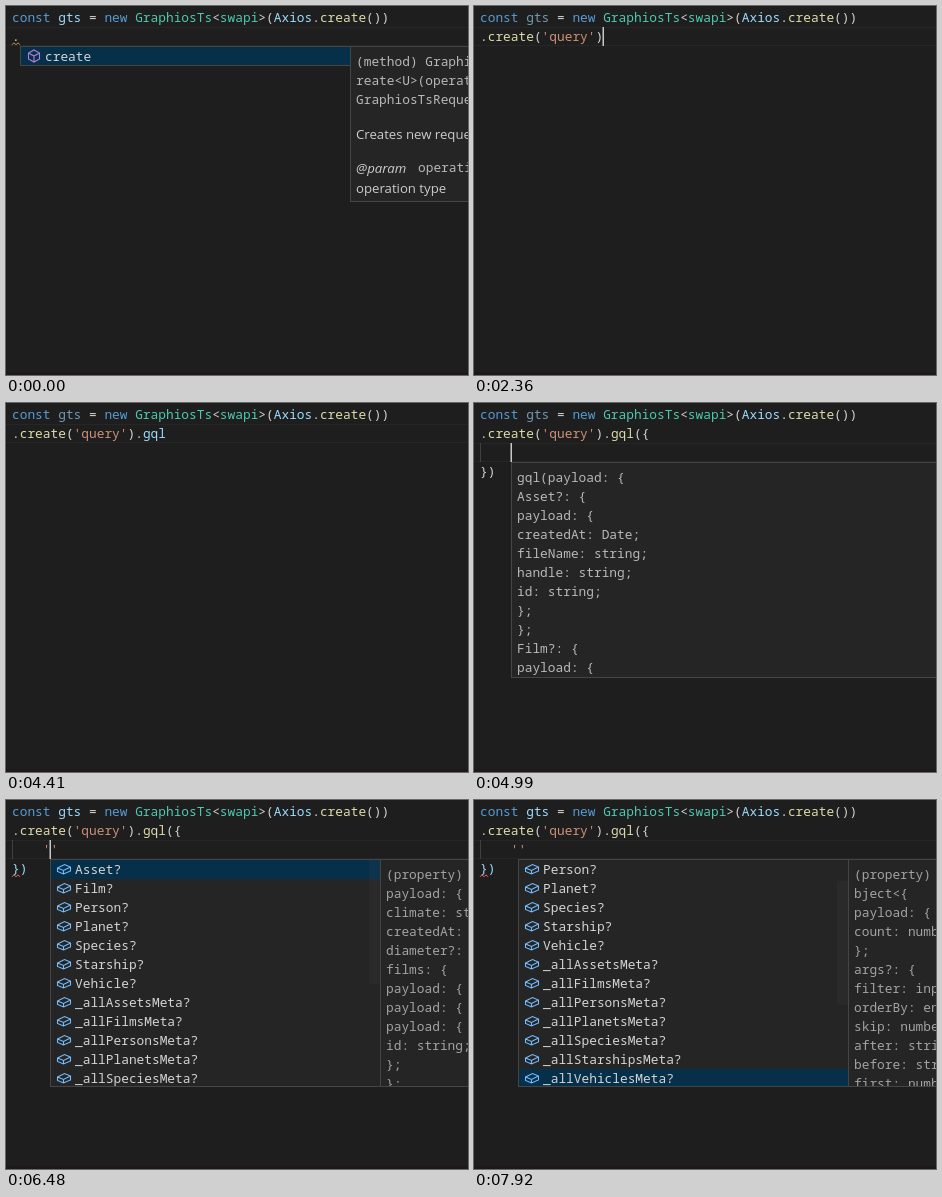
Recreate the animation shown at these times as an HTML page. Size 462 by 369 pixels, loop 8 s.

```html
<!DOCTYPE html>
<html lang="en">
<head>
<meta charset="utf-8">
<title>Typed query autocompletion</title>
<style>
  html, body { margin: 0; width: 100%; height: 100%; overflow: hidden; background: #1e1e1e; }
  svg { display: block; }
  text { white-space: pre; font: 12.83px "Noto Sans Mono", monospace; }
  text.prose { font: 13.2px "Open Sans", sans-serif; }
  text.prose.em { font-style: italic; }
</style>
</head>
<body>
<svg id="stage" width="462" height="369" viewBox="0 0 462 369"></svg>
<script>
(() => {
const LOOP = 8000, LEFT = 6, CHAR = 7.698, LINE = 19;
const stage = document.getElementById('stage');

const COLORS = {
  d: '#d4d4d4', k: '#569cd6', v: '#9cdcfe', c: '#4ec9b0',
  f: '#dcdcaa', s: '#ce9178', u: '#709bb2'
};
const ERROR = '#ec6a5a', WARN = '#d18a4a', PROSE = '#cccccc', HINT = '#b8b8b8';
const ICONS = {
  method: ['#b180d7', 'M0-6L5.5-3V3L0 6L-5.5 3V-3ZM-5.5-3L0 0L5.5-3M0 0V6'],
  field: ['#75beff', 'M-6.5-1L.5-4.5L6.5-2V2L-.5 5L-6.5 2.5ZM-6.5-1L-.5 1.5L6.5-2M-.5 1.5V5'],
  value: ['#d4d4d4', 'M-5-4.5H5Q6.5-4.5 6.5-3V3Q6.5 4.5 5 4.5H-5Q-6.5 4.5-6.5 3V-3Q-6.5-4.5-5-4.5ZM-3.5-1.5H3.5M-3.5 1.5H3.5']
};

const esc = s => s.replace(/&/g, '&amp;').replace(/</g, '&lt;');
const colX = n => LEFT + n * CHAR;
const lineY = line => 2 + line * LINE;
const text = (x, y, s, fill = '#d4d4d4', cls = '') =>
  `<text x="${x}" y="${y}" fill="${fill}" class="${cls}">${esc(s)}</text>`;
const rect = (x, y, w, h, fill) =>
  `<rect x="${x}" y="${y}" width="${w}" height="${h}" fill="${fill}"/>`;
const box = (x, y, w, h) =>
  `<rect x="${x + .5}" y="${y + .5}" width="${w - 1}" height="${h - 1}" fill="#252526" stroke="#454545"/>`;
const clip = (x, y, w, h, body) =>
  `<svg x="${x}" y="${y}" width="${w}" height="${h}" viewBox="${x} ${y} ${w} ${h}">${body}</svg>`;

// Each token is a colour key followed by its text.
function code(line, tokens) {
  const spans = tokens.map(t => `<tspan fill="${COLORS[t[0]]}">${esc(t.slice(1))}</tspan>`);
  return `<text x="${LEFT}" y="${lineY(line) + 14}">${spans.join('')}</text>`;
}

function caret(line, n) {
  return rect(Math.round(colX(n)) - .5, lineY(line), 1.5, LINE, '#c8c8c8');
}

function squiggle(line, from, to, color = ERROR) {
  const end = colX(to), y = lineY(line) + 16.8;
  let x = colX(from), d = `M${x} ${y + 1}`;
  for (let i = 0; x + 2 <= end + .5; i++) d += `L${x += 2} ${y + (i % 2 ? 1 : -1)}`;
  return `<path d="${d}" fill="none" stroke="${color}"/>`;
}

function icon(kind, x, y) {
  const [color, d] = ICONS[kind];
  return `<path transform="translate(${x} ${y})" d="${d}" fill="none" stroke="${color}" stroke-width="1.1"/>`;
}

// Items are [icon, label, detail?].
function menu(x, y, w, h, items, selected, scroll = 0) {
  let rows = '';
  items.slice(scroll).forEach(([kind, label, detail], i) => {
    const rowY = y + 1 + i * LINE;
    if (i + scroll === selected) rows += rect(x + 1, rowY, w - 2, LINE, '#062f4a');
    rows += icon(kind, x + 14, rowY + 9) + text(x + 25, rowY + 14, label);
    if (detail) rows += text(432, rowY + 14, detail, '#a0a0a0');
  });
  return box(x, y, w, h) + clip(x + 1, y + 1, w - 2, h - 2, rows);
}

function panel(x, y, h, lines, fill = '#a3a3a3') {
  const body = lines.map((s, i) => text(x + 6, y + 20 + i * LINE, s, fill)).join('');
  return box(x, y, 480 - x, h) + clip(x + 1, y + 1, 478 - x, h - 2, body);
}

function createMenu() {
  return menu(14, 40, 331, 20, [['method', 'create']], 0) +
    panel(344, 40, 156, ['(method) Graphios', 'reate<U>(operation', 'GraphiosTsRequest'], HINT) +
    text(350, 133, 'Creates new request object.', PROSE, 'prose') +
    text(350, 167, '@param', PROSE, 'prose em') +
    text(412, 166, 'operation', HINT) +
    text(350, 187, 'operation type', PROSE, 'prose');
}

function createHint(x) {
  return panel(x, 40, 76, ['create(operation: "mutation" | "query" | "subscription")'], HINT) +
    text(x + 6, 84, 'operation type', PROSE, 'prose') +
    text(x + 6, 105, 'Creates new request object.', PROSE, 'prose');
}

function kindMenu(selected) {
  const items = ['mutation', 'query', 'subscription'].map((s, i) =>
    ['value', s, i === selected ? s : '']);
  return box(75, -10, 405, 33) +
    text(81, 9, 'Creates new request object.', PROSE, 'prose') +
    menu(75, 40, 405, 57, items, selected);
}

const MEMBERS = ['_name', 'gql', 'operation', 'parse', 'refetch', 'request', 'settings']
  .map(s => [/^(_name|operation|settings)$/.test(s) ? 'field' : 'method', s]);
const memberMenu = selected => menu(137, 40, 343, 133, MEMBERS, selected);

const TYPES = ['Asset', 'Film', 'Person', 'Planet', 'Species', 'Starship', 'Vehicle'];
const FIELDS = [
  ...TYPES.map(s => s + '?'),
  ...TYPES.map(s => `_all${s.replace(/s?$/, 's')}Meta?`)
].map(s => ['field', s]);
const TYPE_DOC = ['(property)', 'payload: {', 'climate: string;', 'createdAt: Date;', 'diameter?: number;',
  'films: {', 'payload: {', 'payload: {', 'payload: {', 'id: string;', '};', '};'];
const META_DOC = ['(property)', 'bject<{', 'payload: {', 'count: number;', '};', 'args?: {',
  'filter: input;', 'orderBy: enum;', 'skip: number;', 'after: string;', 'before: string;', 'first: number;'];

function fieldMenu(selected) {
  const scroll = Math.max(0, selected - 11), thumb = 124;
  return menu(44, 59, 331, 228, FIELDS, selected, scroll) +
    rect(363, 60 + scroll * LINE * thumb / 228, 11, thumb, 'rgba(121,121,121,.06)') +
    panel(374, 59, 228, selected < TYPES.length ? TYPE_DOC : META_DOC);
}

const QUERY_HINT = ['gql(payload: {', 'Asset?: {', 'payload: {', 'createdAt: Date;', 'fileName: string;',
  'handle: string;', 'id: string;', '};', '};', 'Film?: {', 'payload: {'];
const queryHint = (x, y) => panel(x, y, 216, QUERY_HINT, HINT);

const CREATE = ['d.', 'fcreate'];
const QUERY = [...CREATE, 'd(', "s'query'", 'd)'];
const EMPTY = [...CREATE, 'd(', "s''", 'd)'];
const MEMBER = [...QUERY, 'd.'];

// The variable is faded while the checker sees it as unused.
function first(faded) {
  return code(0, ['kconst', 'd ', faded ? 'ugts' : 'vgts', 'd = ', 'knew', 'd ', 'cGraphiosTs', 'd<', 'cswapi',
    'd>(', 'vAxios', 'd.', 'fcreate', 'd())']);
}
function activeLine(line) {
  return rect(0, lineY(line), 462, 1, '#262626') + rect(0, lineY(line) + LINE - 1, 462, 1, '#262626');
}
function editing(tokens, extra = '', faded = true) {
  return activeLine(1) + first(faded) + code(1, tokens) + extra;
}
function block(extra = '', key = '', faded = true) {
  return activeLine(2) + rect(LEFT, lineY(2), 1, LINE, '#404040') +
    first(faded) + code(1, [...MEMBER, 'fgql', 'd({']) +
    code(2, ['d    ', 's' + key]) + code(3, [faded ? 'd})' : 'v})']) + extra;
}
function picking(selected, blink) {
  const cursor = blink ? caret(2, 5) : '';
  return block(squiggle(3, 0, 1) + cursor + fieldMenu(selected), "''", false);
}

const STEPS = [
  [0, () => editing(['d.'], squiggle(1, 0, 1, WARN) + createMenu(), false)],
  [300, () => editing(CREATE, caret(1, 7), false)],
  [580, () => editing([...CREATE, 'd()'], caret(1, 8))],
  [880, () => editing([...CREATE, 'd()'], squiggle(1, 1, 9) + createHint(68))],
  [1180, () => editing(EMPTY, squiggle(1, 1, 11) + caret(1, 9) + createHint(75))],
  [1480, () => editing(EMPTY, squiggle(1, 1, 11) + caret(1, 9) + kindMenu(0))],
  [1760, () => editing(EMPTY, squiggle(1, 1, 11) + kindMenu(1))],
  [2060, () => editing(QUERY, caret(1, 14))],
  [2360, () => editing(QUERY, caret(1, 16))],
  [2660, () => editing(MEMBER, caret(1, 17))],
  [2960, () => editing(MEMBER, memberMenu(0), false)],
  [3240, () => editing(MEMBER, squiggle(1, 16, 17) + memberMenu(0), false)],
  [3540, () => editing(MEMBER, squiggle(1, 16, 17) + memberMenu(0) + caret(1, 17), false)],
  [3820, () => editing(MEMBER, squiggle(1, 16, 17) + memberMenu(1), false)],
  [4110, () => editing([...MEMBER, 'vgql'], caret(1, 20), false)],
  [4410, () => editing([...MEMBER, 'vgql'])],
  [4710, () => editing([...MEMBER, 'fgql', 'd()'], caret(1, 21) + queryHint(168, 40))],
  [4990, () => block(caret(2, 4) + queryHint(37, 59))],
  [5600, () => block()],
  [5880, () => block(caret(2, 4))],
  [6180, () => block(squiggle(3, 0, 1) + caret(2, 5), "''")],
  [6480, () => picking(0, true)],
  [6760, () => picking(1, false)],
  [7060, () => picking(3, true)],
  [7340, () => picking(6, true)],
  [7620, () => picking(10, false)],
  [7920, () => picking(13, false)]
];

let shown = -1;
function render(t) {
  let i = STEPS.length - 1;
  while (STEPS[i][0] > t) i--;
  if (i === shown) return;
  shown = i;
  stage.innerHTML = rect(0, 0, 462, 369, '#1e1e1e') + rect(0, 366, 462, 3, '#1f181a') + STEPS[i][1]();
}

const start = performance.now();
function tick() {
  render(Math.max(0, performance.now() - start) % LOOP);
  requestAnimationFrame(tick);
}
tick();
})();
</script>
</body>
</html>
```
